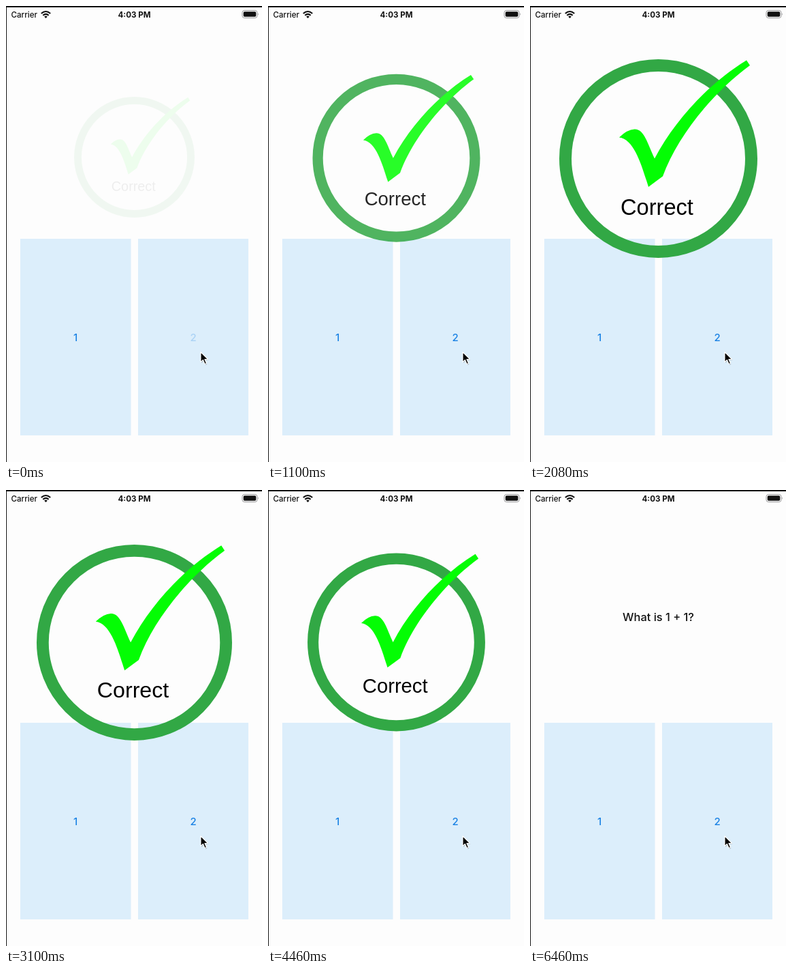
Animation, 376 px wide and 668 px high, one loop 6.48 s. Source, as an HTML page:

```html
<!DOCTYPE html>
<html lang="en">
<head>
<meta charset="utf-8">
<title>Quiz</title>
<style>
  html, body { margin: 0; width: 100%; height: 100%; overflow: hidden; background: #fdfdfd; }
  svg { display: block; width: 376px; height: 668px; }
  text { font-family: Inter, Roboto, sans-serif; }
  .mid { text-anchor: middle; }
  .status { font-size: 11.6px; fill: #111; }
  .card { fill: #dceefb; }
  .answer { font-size: 15px; font-weight: 500; fill: #1a82e4; }
</style>
</head>
<body>
<svg viewBox="0 0 376 668">
  <rect width="376" height="668" fill="#fdfdfd"/>
  <path d="M0 0H376V2H1V668H0Z" fill="#151515"/>

  <g class="status">
    <text x="7.5" y="16.5" font-weight="500">Carrier</text>
    <text class="mid" x="188.5" y="16.5" font-weight="700">4:03 PM</text>
    <g fill="none" stroke="#111" stroke-width="2.1">
      <path d="M51.8 11.1Q58.5 4.9 65.2 11.1M54.3 13.7Q58.5 9.9 62.7 13.7"/>
    </g>
    <path d="M56.2 15.4Q58.5 13.4 60.8 15.4L58.5 17.9Z"/>
    <rect x="347" y="6.5" width="22" height="11" rx="3.2" fill="none" stroke="#99999b"/>
    <rect x="348.7" y="8.2" width="18.6" height="7.6" rx="1.8"/>
    <path d="M370.3 10.2q1.8 1.8 0 3.6z" fill="#99999b"/>
  </g>

  <rect class="card" x="21" y="341" width="162.5" height="288"/>
  <rect class="card" x="194" y="341" width="162" height="288"/>
  <text class="answer mid" x="102" y="490.5">1</text>
  <text class="answer mid" id="picked" x="275" y="490.5">2</text>

  <text class="mid" id="question" x="188.5" y="192" font-size="16.4" font-weight="450" fill="#111">What is 1 + 1?</text>

  <!-- Drawn with a badge diameter of 291, relative to the scaling centre -->
  <g id="badge">
    <circle cy="5.1" r="136.5" fill="none" stroke="#32a845" stroke-width="18"/>
    <path fill="#04fd04" d="M-57.5-26Q-46-37.5-35-38C-21-38.5-16-17.5-5.5 5
      C25-52.5 75-105.5 129.5-139L134.5-131.5C82-93.5 28-28.5 6.5 31L-14.5 46.5
      C-24 17-35-23.5-57.5-26Z"/>
    <text class="mid" x="-2" y="87.2" fill="#000" style="font: 32.6px 'Liberation Sans', Arial, sans-serif">Correct</text>
  </g>

  <g stroke-linejoin="round">
    <path d="M287 508.5v14.6l3.4-3.2 2.7 6.1 2.4-1-2.6-5.9h4.7z" fill="#000" opacity=".18"/>
    <path d="M286 507v14.6l3.4-3.2 2.7 6.1 2.4-1-2.6-5.9h4.7z" fill="#000" stroke="#fff" stroke-width="1.1"/>
  </g>
</svg>
<script>
  const LOOP = 6480, END = 6440;
  // [time, badge diameter]
  const path = [[0, 177], [580, 214], [1100, 246], [2080, 291], [2640, 301], [3100, 287],
    [3800, 269], [4180, 265], [4880, 254], [5200, 249], [5600, 247.5]];
  const [badge, question, picked] = ['badge', 'question', 'picked'].map(id => document.getElementById(id));
  const clamp = v => Math.max(0, Math.min(1, v));

  const rate = i => (path[i + 1][1] - path[i][1]) / (path[i + 1][0] - path[i][0]);
  function slope(i) {
    if (i === 0) return rate(0);
    if (i === path.length - 1) return 0;
    const a = rate(i - 1), b = rate(i);
    return a * b > 0 ? 2 * a * b / (a + b) : 0;
  }

  function diameter(t) {
    const last = path.length - 1;
    if (t >= path[last][0]) return path[last][1];
    let i = 0;
    while (t >= path[i + 1][0]) i++;
    const [t0, a] = path[i], [t1, b] = path[i + 1];
    const h = t1 - t0, u = (t - t0) / h, w = 1 - u;
    return a * w * w * (1 + 2 * u) + b * u * u * (3 - 2 * u)
      + h * u * w * (w * slope(i) - u * slope(i + 1));
  }

  // The picture advances in an uneven 20, 20, 100 ms rhythm.
  function snap(t) {
    const r = (t + 20) % 140;
    return Math.max(0, t - r + (r < 20 ? 0 : r < 40 ? 20 : 40));
  }

  function draw(t) {
    const done = t >= END, s = snap(t), d = diameter(s);
    question.style.visibility = done ? 'visible' : 'hidden';
    badge.style.visibility = done ? 'hidden' : 'visible';
    badge.setAttribute('transform', `translate(188.5 218.4) scale(${d / 291})`);
    badge.setAttribute('opacity', clamp((d - 172) / 87));
    picked.setAttribute('opacity', done ? 1 : clamp(.25 + s / 700));
  }

  const start = performance.now();
  function tick() {
    draw((performance.now() - start) % LOOP);
    requestAnimationFrame(tick);
  }
  tick();
</script>
</body>
</html>
```
